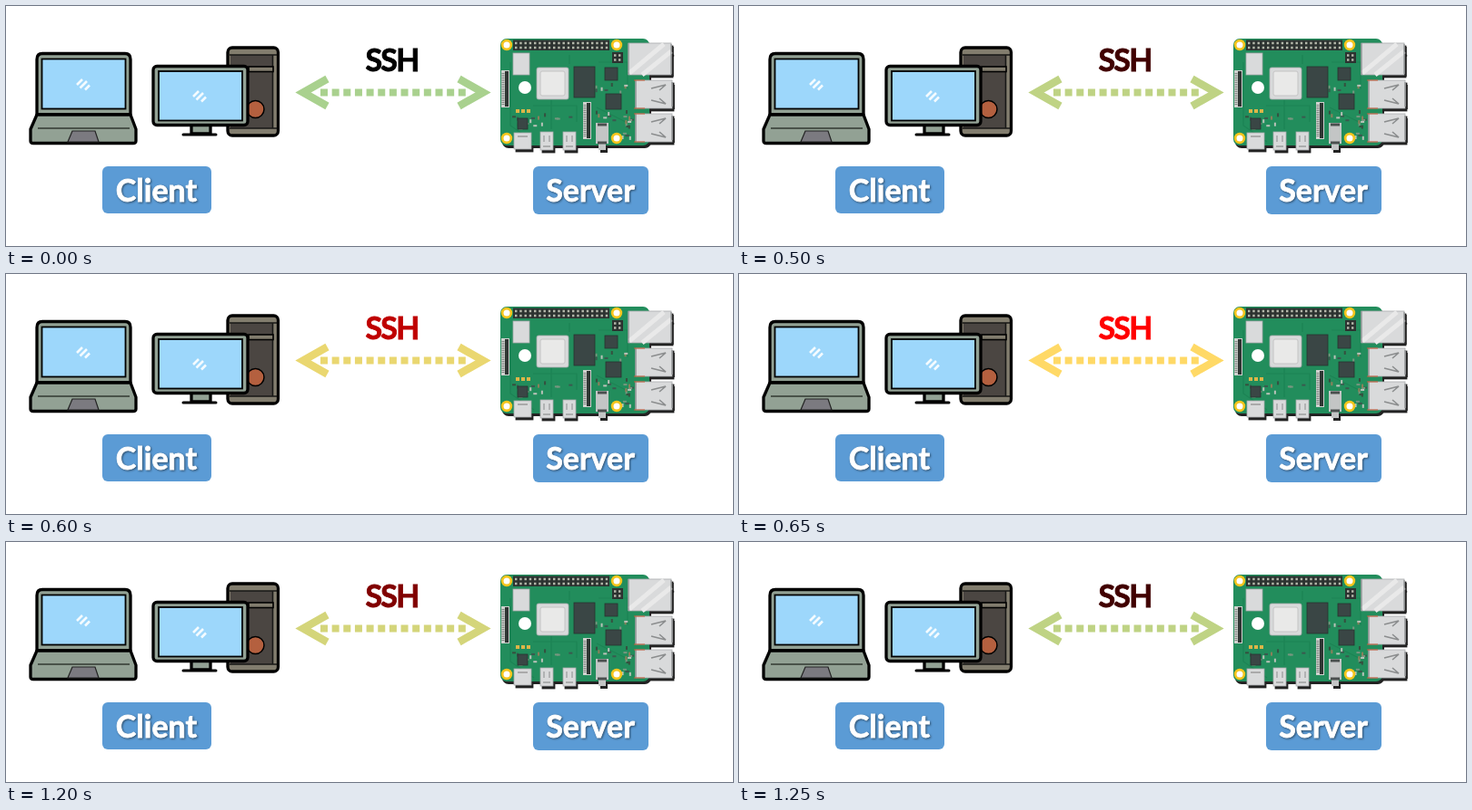
Recreate the animation shown at these times as an HTML page. Size 800 by 265 pixels, loop 1.3 s.

```html
<!DOCTYPE html>
<html lang="en">
<head>
<meta charset="utf-8">
<title>SSH between client and server</title>
<style>
  html, body { margin: 0; width: 100%; height: 100%; overflow: hidden; background: #fff; }
  svg { display: block; width: 100vw; height: 100vh; }
  text { font: 700 34px Lato, Carlito, sans-serif; text-anchor: middle; stroke-width: .8; }
  .label text { fill: #fff; stroke: #fff; filter: drop-shadow(1.5px 1.5px 1px rgba(0, 0, 0, .5)); }
  .label rect { fill: #5b9bd5; }
  #ssh { letter-spacing: -1.8px; }
  #board { filter: drop-shadow(2px 3px 0 #222); }
  .ink { stroke: #000; stroke-width: 3.3; stroke-linejoin: round; }
  .body { fill: #92a194; }
  .screen { fill: #9dd7fb; stroke: #000; stroke-width: 1.8; }
  .metal { fill: #d9dadb; stroke: #a9abac; stroke-width: .8; }
  .chip { fill: #3a4645; stroke: #26332f; stroke-width: .8; }
</style>
</head>
<body>
<svg viewBox="0 0 800 265">
  <defs>
    <path id="glint" d="M-7 1L-1-5M-3.500 4.500L4-3M2 6.500L7 1.500" stroke="#f4fbff" stroke-width="2.6"/>
    <g id="hole">
      <circle r="6.2" fill="#f5c51c"/>
      <circle r="3.5" fill="#fff"/>
    </g>
    <g id="usb">
      <rect class="metal" width="40" height="31"/>
      <path d="M0 0V31M40 2V29" stroke="#9a9c9d" stroke-width="1.6"/>
      <path d="M17 9L33 5L26 11M17 22L33 26L26 20" fill="none" stroke="#8b8d8e" stroke-width="1.6"/>
      <path d="M-2 0H10M-2 31H10" stroke="#c95a36" stroke-width="1.2"/>
    </g>
    <g id="hdmi">
      <rect class="metal" width="14" height="20"/>
      <path d="M4 4V11M10 4V11M3 16H11" stroke="#9c9e9f" stroke-width="1.3"/>
    </g>
    <g id="ribbon">
      <rect width="9" height="41" fill="#d0d2cf"/>
      <path d="M6 1V40" stroke="#2f3633" stroke-width="4"/>
      <path d="M2 3V38" stroke="#7b817d" stroke-width="3" stroke-dasharray="1 1"/>
    </g>
  </defs>

  <!-- Tower -->
  <rect class="ink" x="244" y="46" width="55.500" height="97" rx="5" fill="#827d6e"/>
  <rect x="247" y="54" width="46" height="81" fill="#4b4642"/>
  <path d="M246 54H298M246 135H298M293.500 54V135" stroke="#171716" stroke-width="1.6"/>
  <rect x="267" y="67" width="27" height="5.500" fill="#827d6e" stroke="#000" stroke-width="1.6"/>
  <circle cx="274.500" cy="114" r="9.5" fill="#b4603f" stroke="#000" stroke-width="1.5"/>

  <!-- Monitor -->
  <path class="ink body" d="M204 131H225V141H204Z"/>
  <path d="M195 142H231" stroke="#000" stroke-width="3" stroke-linecap="round"/>
  <rect class="ink body" x="162" y="66.500" width="104" height="65" rx="4"/>
  <rect class="screen" x="168" y="72" width="92" height="54.500"/>
  <use href="#glint" x="213" y="99"/>

  <!-- Laptop -->
  <path class="ink body" d="M34 120V59Q34 52.500 40 52.500H131Q137 52.500 137 59V120Z"/>
  <rect class="screen" x="39.500" y="58.500" width="92" height="55"/>
  <use href="#glint" x="85" y="86"/>
  <path class="ink body" d="M34 120H137L143 136V149Q143 151.500 140 151.500H30Q27 151.500 27 149V136Z"/>
  <path d="M35 135H136" stroke="#303830" stroke-width="1.4"/>
  <path d="M73 138H98L102 150H68Z" fill="#7b7a80" stroke="#222" stroke-width="1.2"/>

  <!-- Board -->
  <g id="board">
    <rect x="544" y="36" width="164" height="118" rx="7" fill="#228d5c"/>
    <path d="M555 62V132L581 150M580 110H628V128M600 104V136M650 112L682 128M652 62H684V92M620 54V64"
          fill="none" stroke="#1c8354" stroke-width="1.2"/>
    <g id="parts"></g>
    <rect x="558" y="37.500" width="106" height="11.500" fill="#2c3230"/>
    <path d="M560 41H663M560 46H663" stroke="#b5b8ab" stroke-width="2.4" stroke-dasharray="2.4 2.85"/>
    <rect x="667" y="51" width="12" height="12" fill="#2c3230"/>
    <path d="M669 54.500H678M669 59.500H678" stroke="#b5b8ab" stroke-width="2.4" stroke-dasharray="2.4 2.6"/>
    <rect class="metal" x="558" y="52" width="18" height="24"/>
    <circle cx="571" cy="90" r="7" fill="#fff"/>
    <rect class="metal" x="584" y="68" width="35" height="35" rx="2"/>
    <rect x="588" y="72" width="27" height="27" rx="2" fill="#e9e9e8" stroke="#c4c4c4"/>
    <rect class="chip" x="625" y="67" width="23" height="34"/>
    <rect class="chip" x="659" y="68" width="14" height="14"/>
    <rect class="chip" x="660" y="97" width="17" height="17"/>
    <rect class="chip" x="563" y="124" width="11" height="12"/>
    <path d="M561 116H577" stroke="#dcb648" stroke-width="4" stroke-dasharray="4 2"/>
    <use href="#ribbon" x="545" y="71"/>
    <use href="#ribbon" x="635" y="106"/>
    <rect class="metal" x="559" y="140" width="19" height="18"/>
    <path d="M563 144H574" stroke="#aaa" stroke-width="2"/>
    <use href="#hdmi" x="588" y="139"/>
    <use href="#hdmi" x="613" y="139"/>
    <path d="M649 129H663V152H660V159H652V152H649Z" fill="#c3c5c5"/>
    <path d="M651 131H661M651 151H661" stroke="#4a4f4e" stroke-width="3"/>
    <rect class="metal" x="685" y="41" width="47" height="35"/>
    <path d="M686 74L724 42M700 76L732 50" stroke="#e9e9e9" stroke-width="5"/>
    <path d="M685 41V76M732 42V75" stroke="#9a9c9d" stroke-width="1.4"/>
    <use href="#usb" x="693" y="82"/>
    <use href="#usb" x="693" y="119"/>
    <use href="#hole" x="551" y="43"/>
    <use href="#hole" x="672" y="43"/>
    <use href="#hole" x="551" y="146"/>
    <use href="#hole" x="672" y="146"/>
  </g>

  <!-- Labels -->
  <g class="label">
    <rect x="106" y="177" width="120" height="52" rx="6"/>
    <text x="165.500" y="216">Client</text>
    <rect x="580" y="177" width="127" height="53" rx="6"/>
    <text x="643" y="216">Server</text>
  </g>

  <!-- Connection -->
  <text id="ssh" x="424.500" y="72">SSH</text>
  <g id="arrow" fill="none" stroke-width="8">
    <path d="M346 95.500H506" stroke-dasharray="8 4.650"/>
    <path d="M353.500 80.500L327 95.500L353.500 110.500M498.500 80.500L525 95.500L498.500 110.500" stroke-width="8.500"/>
  </g>
</svg>
<script>
  const ssh = document.getElementById('ssh');
  const arrow = document.getElementById('arrow');

  // Small surface-mounted parts, scattered in a few zones of the board
  let seed = 11;
  const random = () => (seed = seed * 16807 % 2147483647) / 2147483647;
  const tones = ['#3a5a4e', '#b9c2b8', '#76977f', '#35503f', '#8d805b'];
  const scatter = (x, y, w, h, count) => {
    let out = '';
    for (let i = 0; i < count; i++) {
      const px = x + random() * w, py = y + random() * h, wide = random() < .5;
      out += `<rect x="${px}" y="${py}" width="${wide ? 4 : 2}" height="${wide ? 2 : 4}" fill="${tones[i % 5]}"/>`;
    }
    return out;
  };
  document.getElementById('parts').innerHTML =
    scatter(578, 114, 50, 20, 8) + scatter(648, 84, 34, 10, 8) +
    scatter(647, 115, 40, 12, 12) + scatter(676, 120, 10, 24, 9) +
    scatter(557, 121, 22, 16, 9);

  const mix = (from, to, k) =>
    `rgb(${from.map((c, i) => Math.round(c + (to[i] - c) * k))})`;

  // Hold, fade in 50 ms steps, hold, fade back
  const heat = t => {
    if (t < 500) return 0;
    if (t < 650) return (Math.floor((t - 500) / 50) + 1) / 4;
    if (t < 1150) return 1;
    return (3 - Math.floor((t - 1150) / 50)) / 4;
  };

  function draw() {
    const k = heat(performance.now() % 1300);
    ssh.style.fill = ssh.style.stroke = mix([0, 0, 0], [255, 0, 0], k);
    arrow.style.stroke = mix([169, 209, 142], [255, 217, 102], k);
    requestAnimationFrame(draw);
  }
  draw();
</script>
</body>
</html>
```
